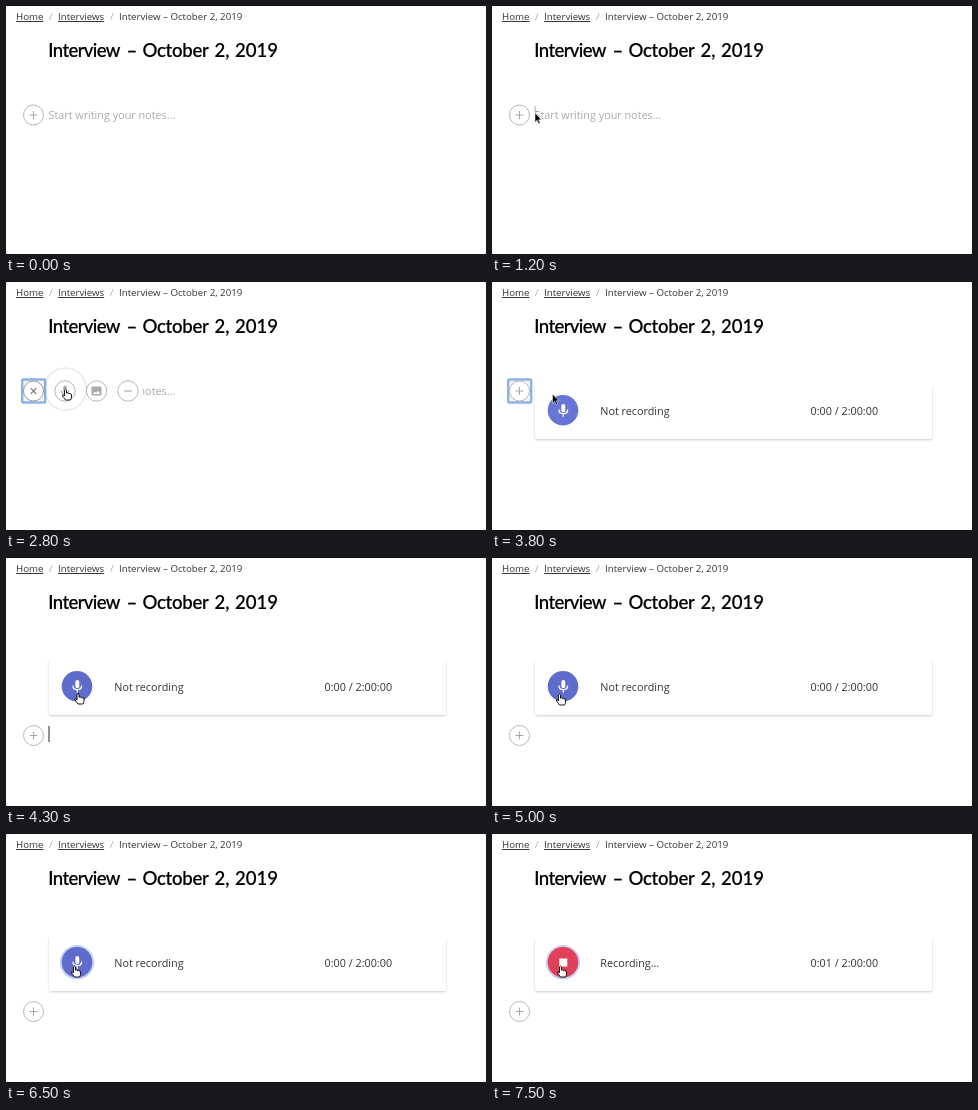
Animation of 480x248 px, one loop 8 s. Source, as an HTML page:

```html
<!DOCTYPE html>
<html lang="en">
<head>
<meta charset="utf-8">
<title>Interview notes</title>
<style>
  html, body { margin: 0; width: 100%; height: 100%; overflow: hidden; background: #c4c4c4; }
  svg { display: block; width: 480px; height: 248px; background: #fff; border-radius: 2px; }
  text { font-family: "Open Sans", sans-serif; font-size: 10.8px; fill: #333; white-space: pre; }
  .crumbs text { font-size: 9.7px; }
  .crumbs .sep, .hint { fill: #aaa; }
  .link { text-decoration: underline; }
  .title { font: 500 18.6px Lato, sans-serif; fill: #000; stroke: #000; stroke-width: .2; }
  .ring { fill: #fff; stroke: #b8b8b8; stroke-width: 1; }
  .line { fill: none; stroke: #a8a8a8; stroke-width: 1; }
  .open .ring { stroke: #999; }
  .open .line { stroke: #777; stroke-width: 1.2; }
  .icon { fill: #aaa; color: #aaa; }
  .focus { fill: #f3f6fc; stroke: #8fb1e6; stroke-width: 2.4; }
  .card { fill: #fff; filter: drop-shadow(0 1px 1.2px rgba(0, 0, 0, .2)); }
  .glyph { fill: #fff; color: #fff; }
</style>
</head>
<body>
<svg viewBox="0 0 480 248">
  <defs>
    <g id="mic">
      <rect x="-1.7" y="-5.5" width="3.4" height="7.2" rx="1.7"/>
      <path d="M-3.8-.7C-3.8 4.2 3.8 4.2 3.8-.7M0 3V5.6" fill="none" stroke="currentColor" stroke-width="1.1"/>
    </g>
    <path id="image" fill-rule="evenodd" d="M-4-4.5H4Q5-4.5 5-3.5V3.5Q5 4.5 4 4.5H-4Q-5 4.5-5 3.5V-3.5Q-5-4.5-4-4.5ZM-3.7 3H3.7L1.4-.3-.5 2-1.7.5Z"/>
    <rect id="minus" x="-4" y="-.55" width="8" height="1.1"/>
  </defs>

  <g class="crumbs">
    <text class="link" x="10" y="14">Home</text>
    <text class="sep" x="43" y="14">/</text>
    <text class="link" x="52" y="14">Interviews</text>
    <text class="sep" x="104" y="14">/</text>
    <text x="113" y="14">Interview – October 2, 2019</text>
  </g>
  <text class="title" y="51"><tspan x="42.3" letter-spacing="-.65">Interview </tspan><tspan x="120.5">– </tspan><tspan x="136.5" letter-spacing="-.3">October </tspan><tspan x="208.5">2, </tspan><tspan x="229">2019</tspan></text>

  <text id="hint" class="hint" x="42.5" y="112.5">Start writing your notes…</text>

  <g id="card">
    <rect class="card" x="43" y="101" width="397" height="56" rx="2"/>
    <rect x="40" y="97" width="403" height="7" fill="#fff"/>
    <circle id="halo" cx="71" cy="128.3" r="17.2" fill="#c9d0f3"/>
    <circle id="disc" cx="71" cy="128.3" r="15.3"/>
    <use id="micOn" class="glyph" href="#mic" transform="translate(71.3 128.3) scale(1.15)"/>
    <rect id="stop" class="glyph" x="67.3" y="124.5" width="8" height="8"/>
    <text id="status" x="108.3" y="132.5"></text>
    <text id="clock" x="318.5" y="132.5"></text>
  </g>
  <path id="caret" d="M43 168V184" stroke="#222"/>

  <g id="menu">
    <rect id="cover" x="40" y="97" height="24" fill="#fff"/>
    <g class="tool"><circle class="ring" r="10.2"/><use class="icon" href="#mic"/></g>
    <g class="tool"><circle class="ring" r="10.2"/><use class="icon" href="#image"/></g>
    <g class="tool"><circle class="ring" r="10.2"/><use class="icon" href="#minus"/></g>
  </g>

  <g id="add">
    <rect id="focus" class="focus" x="-11.3" y="-11.5" width="23" height="23" rx="1"/>
    <circle class="ring" r="10"/>
    <path id="cross" class="line" d="M-4 0H4M0-4V4"/>
  </g>

  <path id="trace" d="M43 100V105.5H46" fill="none" stroke="#999" stroke-width=".9"/>
  <circle id="ripple" fill="none" stroke="#777" stroke-width="1.5"/>
  <g id="cursor">
    <path id="arrow" d="M0 0V9.3L2.1 7.3 3.7 10.8 5.2 10.1 3.6 6.8H6.4Z" fill="#000" stroke="#fff" stroke-width=".5"/>
    <path id="beam" d="M-2-6Q0-6 0-4.5Q0-6 2-6M0-4.5V4.5M-2 6Q0 6 0 4.5Q0 6 2 6" fill="none" stroke="#333" stroke-width=".9"/>
    <path id="hand" d="M-1 1Q0-.9 1 1V4.2Q2 3.3 2.8 4.5Q3.8 3.8 4.5 4.9Q6 4.5 6 6V8Q6 9.5 5 11H0Q-.8 9.5-3 7Q-3.6 5.8-2.4 5.8Q-1.6 5.9-1 7Z" fill="#fff" stroke="#000" stroke-width=".9" stroke-linejoin="round"/>
  </g>
</svg>
<script>
const LOOP = 8000, STEP = 100;
const $ = id => document.getElementById(id);
const tools = [...document.querySelectorAll('.tool')];

// time, x, y, pointer shape from here on
const path = [
  [300, 178, 217, 'arrow'], [400, 171, 208, 'arrow'], [600, 138, 174, 'arrow'],
  [800, 92, 134, 'arrow'], [900, 70, 114, 'beam'], [1000, 55, 106, 'beam'],
  [1100, 46, 103, 'beam'], [1200, 43, 107, 'arrow'], [1300, 36, 107, 'hand'],
  [1400, 31.5, 106.5, 'hand'], [1800, 31.5, 106.5, 'hand'], [2000, 50, 108.5, 'hand'],
  [2300, 59.5, 107, 'hand'], [3100, 59.5, 107, 'arrow'], [3700, 59.5, 107, 'arrow'],
  [3800, 60.5, 112, 'arrow'], [4000, 66, 124, 'hand'], [4300, 72, 135, 'hand'],
  [4600, 70, 138, 'hand'], [5000, 67.5, 136, 'hand'], [5300, 68.5, 132, 'hand']
];
const clicks = [1500, 2700, 6100, 6500];

const show = (id, on) => $(id).style.display = on ? '' : 'none';
const move = (el, x, y) => el.setAttribute('transform', `translate(${x} ${y})`);
const within = (t, a, b) => t >= a && t < b;
const ramp = (t, a, b) => Math.min(1, Math.max(0, (t - a) / (b - a)));

function pointer(t) {
  const i = path.findLastIndex(k => k[0] <= t);
  if (i < 0) return null;
  const [t0, x0, y0, shape] = path[i];
  const [t1, x1, y1] = path[i + 1] || [t0 + 1, x0, y0];
  const p = ramp(t, t0, t1);
  return { x: x0 + (x1 - x0) * p, y: y0 + (y1 - y0) * p, shape };
}

function drawPointer(t) {
  const at = pointer(t);
  show('cursor', at);
  const click = at && clicks.find(c => within(t, c, c + 200));
  show('ripple', click);
  if (!at) return;
  move($('cursor'), at.x, at.y);
  for (const s of ['arrow', 'beam', 'hand']) show(s, s === at.shape);
  if (!click) return;
  const p = (t - click) / 200;
  move($('ripple'), at.x, at.y);
  $('ripple').setAttribute('r', 5 + 32 * p);
  $('ripple').setAttribute('opacity', .2 - .1 * p);
}

function drawMenu(t) {
  const inserted = t >= 3100;
  const open = inserted ? 0 : 1 - (1 - ramp(t, 1500, 1900)) ** 2;
  show('hint', !inserted);
  show('menu', open > 0);
  $('cover').setAttribute('width', 96.5 * open);
  tools.forEach((tool, i) => {
    move(tool, 27.5 + 31.5 * (i + 1) * open, 109);
    tool.style.opacity = open;
  });
  move($('add'), 27.5, t < 4300 ? 109 : 177.5);
  $('add').classList.toggle('open', open > 0);
  $('cross').setAttribute('transform', `rotate(${45 * open})`);
  show('focus', within(t, 1500, 4300));
  show('trace', within(t, 1200, 1300));
}

function drawRecorder(t) {
  const live = t >= 6600;
  show('card', t >= 3100);
  show('halo', t >= 6200);
  show('micOn', !live);
  show('stop', live);
  $('disc').setAttribute('fill', live ? '#e0405a' : t >= 4000 ? '#5e6dcb' : '#6776d6');
  $('status').textContent = live ? 'Recording…' : 'Not recording';
  $('clock').textContent = `0:0${t >= 7500 ? 1 : 0} / 2:00:00`;
  show('caret', within(t, 4300, 4800) || within(t, 5300, 5800));
}

const start = performance.now();
function frame() {
  const t = Math.floor((performance.now() - start) % LOOP / STEP) * STEP;
  drawMenu(t);
  drawRecorder(t);
  drawPointer(t);
  requestAnimationFrame(frame);
}
frame();
</script>
</body>
</html>
```
